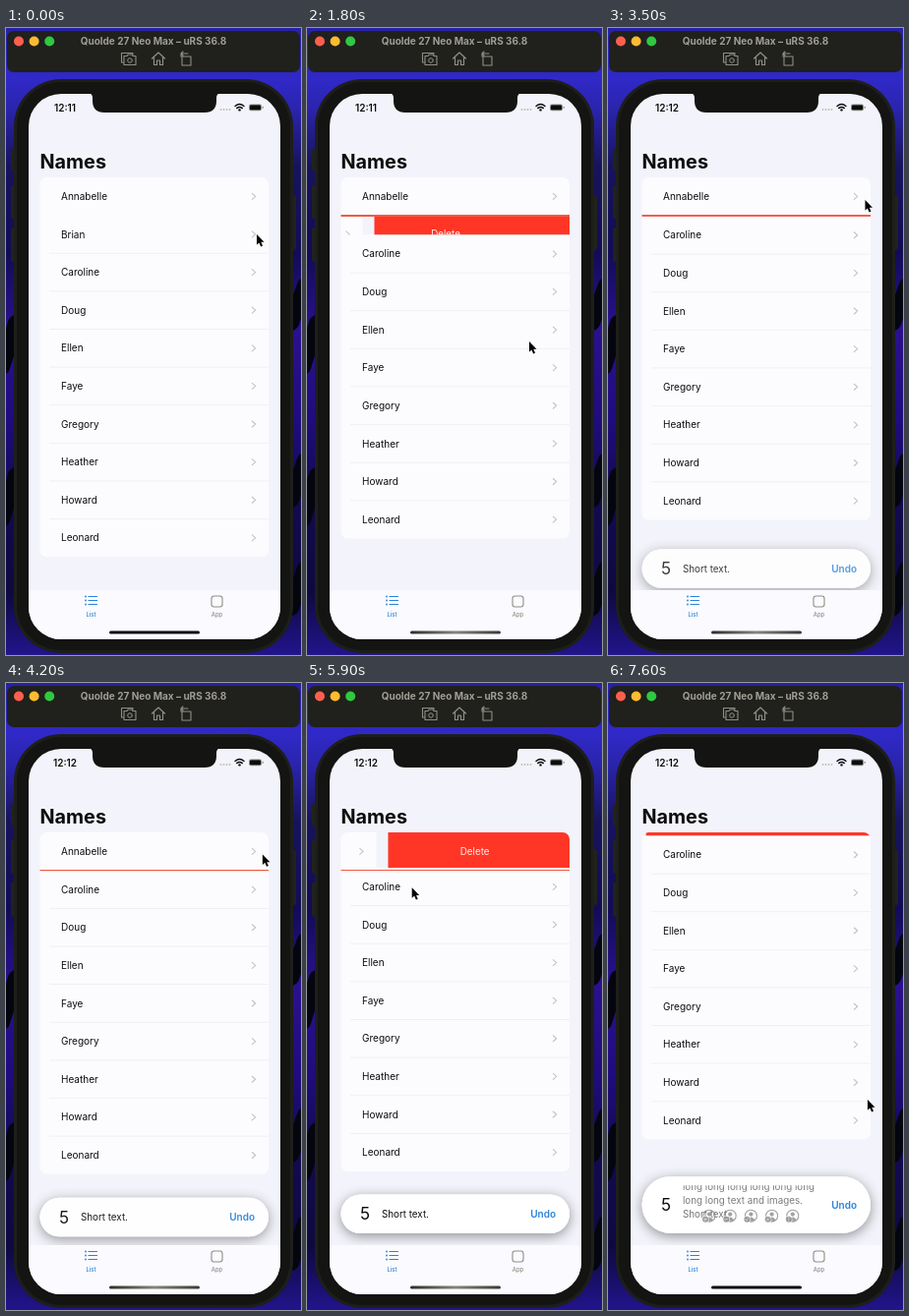
Recreate the animation shown at these times as an HTML page with a canvas. Size 300 by 638 pixels, loop 8000 ms.

```html
<!DOCTYPE html>
<html lang="en">
<head>
<meta charset="utf-8">
<title>Swipe to delete</title>
<style>
html, body { margin: 0; width: 100%; height: 100%; overflow: hidden; background: #0b0b1c; }
canvas { display: block; width: 300px; height: 638px; }
</style>
</head>
<body>
<canvas id="stage"></canvas>
<script>
const LOOP = 8000, W = 300, H = 638, ROW = 38.62;
const LIST = { x: 34.5, y: 152, right: 267 };
const NAMES = ['Annabelle', 'Brian', 'Caroline', 'Doug', 'Ellen', 'Faye', 'Gregory', 'Heather', 'Howard', 'Leonard'];
const HOLDS = [[100, 300], [4800, 5100], [6400, 6600], [6800, 7100], [7100, 7600], [7600, 8000]];
const POINTER = [[300, 255, 210], [1100, 90, 213], [1800, 226, 319], [2800, 254.5, 206.5],
  [3500, 261.5, 175], [5100, 260, 173.5], [5700, 84, 177], [6600, 264, 424]];
const SCREEN = '#f3f3fb', CARD = '#fcfcff', RED = '#ff3626', BLUE = '#2a83d6';
const INK = '#0c0c0c', BODY = '#141412', GRAY = '#8f8f86';

const canvas = document.getElementById('stage');
const c = canvas.getContext('2d');
const ratio = window.devicePixelRatio || 1;
canvas.width = W * ratio;
canvas.height = H * ratio;

const clamp = v => Math.max(0, Math.min(1, v));
const smooth = v => { v = clamp(v); return v * v * (3 - 2 * v); };
const mix = (a, b, k) => a + (b - a) * k;

// What is left of a critically damped spring: 1 at start, falling to 0.
function spring(t, start, speed) {
  const x = Math.max(0, t - start) / 1000 * speed;
  return (1 + x) * Math.exp(-x);
}

function box(x, y, w, h, r, fill) {
  c.beginPath();
  c.roundRect(x, y, w, h, r);
  if (fill) { c.fillStyle = fill; c.fill(); }
}

function disc(x, y, r, fill) {
  c.beginPath();
  c.arc(x, y, r, 0, 7);
  c.fillStyle = fill;
  c.fill();
}

function path(d, color, width = 1, x = 0, y = 0) {
  c.save();
  c.translate(x, y);
  c.strokeStyle = color;
  c.lineWidth = width;
  c.lineCap = c.lineJoin = 'round';
  c.stroke(new Path2D(d));
  c.restore();
}

function text(s, x, y, size, color, weight = 400, align = 'left') {
  c.font = `${weight} ${size}px Inter, "Open Sans", sans-serif`;
  c.textAlign = align;
  c.textBaseline = 'alphabetic';
  c.fillStyle = color;
  c.fillText(s, x, y + size * 0.36);
}

function gradient(x0, y0, x1, y1, stops) {
  const g = c.createLinearGradient(x0, y0, x1, y1);
  stops.forEach(([at, color]) => g.addColorStop(at, color));
  return g;
}

function drawDesktop() {
  c.fillStyle = gradient(0, 0, 0, H, [[0, '#2620a8'], [0.08, '#3029c8'], [0.13, '#2a24ac'], [0.22, '#17145c'],
    [0.36, '#120c58'], [0.48, '#2a118e'], [0.62, '#200c80'], [0.75, '#120a50'], [0.9, '#0e0a40'], [1, '#22148c']]);
  c.fillRect(0, 0, W, H);
  path('M-4 345 L10 300 M-4 500 L10 455 M290 300 L304 262 M290 480 L304 440 M290 590 L304 550', '#05050f', 16);

  box(1, 3, 298, 42, 7, '#20201c');
  ['#ff5f4e', '#fdbc30', '#2fc840'].forEach((color, i) => disc(13 + i * 15.6, 13.5, 5, color));
  text('Quolde 27 Neo Max – uRS 36.8', 150, 13.2, 10, '#a09e96', 700, 'center');
  path('M119 35 H117.5 V25.5 H129 V27 M120 28.5 H123 L124 27 H128 L129 28.5 H132 V37.5 H120 Z', GRAY, 1.1);
  path('M128.3 33 a2.3 2.3 0 1 1 -4.6 0 a2.3 2.3 0 1 1 4.6 0', GRAY);
  path('M148.5 31 L155 25 L161.5 31 M150.5 30 V37.5 H153.5 V33 H156.5 V37.5 H159.5 V30', GRAY, 1.2);
  path('M179 29 H188 V38 H179 Z M178 29 V26 H185 M180 24 L178 26 L180 28', GRAY, 1.1);
}

function drawPhone(t) {
  const button = '#22221c';
  [[5, 123, 22], [5, 160, 34], [5, 203, 35], [290, 170, 56]].forEach(([x, y, h]) => box(x, y, 5, h, 2, button));
  box(8, 52, 284, 584, 48, '#1e1e1a');
  box(11, 55, 278, 578, 45, BODY);
  box(23, 67, 256, 555, 33, SCREEN);
  c.fillStyle = BODY;
  c.fill(new Path2D('M84 66 Q88 67 88 71 V74 Q88 86 100 86 H202 Q214 86 214 74 V71 Q214 67 218 66 Z'));

  text(t < 2300 ? '12:11' : '12:12', 60, 81, 10, INK, 600, 'center');
  for (let i = 0; i < 4; i++) disc(218.5 + i * 3, 83, 0.9, '#bdbdb4');
  path('M233 79.5 Q237.5 75.5 242 79.5 M234.7 81.6 Q237.5 79.2 240.3 81.6', INK, 1.4);
  disc(237.5, 83.4, 1.2, INK);
  box(247, 77.5, 13, 6.8, 2, '#8c8c86');
  box(248, 78.5, 11, 4.8, 1, INK);
  box(260.6, 79.7, 1, 2.4, 0.5, '#8c8c86');
  text('Names', 34.5, 135.5, 19.8, INK, 700);
}

// Red edge follows the drag, then springs to the list edge while the row closes.
function swipe(t, start, release, speed, edge) {
  const drag = smooth((t - start) / (release - start));
  const size = spring(t, release, speed);
  const left = t < release ? mix(LIST.right, edge, drag) : mix(34, edge, size);
  return { size, left, drag };
}

function rowContent(name, y, dx) {
  text(name, 56 + dx, y, 10, INK);
  path('M-1.7 -3 L1.7 0 L-1.7 3', '#c4c4bc', 1.1, 252 + dx, y);
}

function drawRow(name, y, state) {
  const height = state ? ROW * state.size : ROW;
  if (height < 0.3) return height;
  const mid = y + ROW / 2;
  c.save();
  c.beginPath();
  c.rect(LIST.x, y, LIST.right - LIST.x, height);
  c.clip();
  if (state && state.drag > 0) {
    const edge = state.left - Math.min(12, LIST.right - state.left);
    c.fillStyle = SCREEN;
    c.fillRect(LIST.x, y, 240, height);
    c.fillStyle = CARD;
    c.fillRect(LIST.x, y, edge - LIST.x, height);
    rowContent(name, mid, edge - LIST.right);
    c.fillStyle = RED;
    c.beginPath();
    c.rect(state.left, y, LIST.right - state.left, height);
    c.fill();
    c.clip();
    const center = (state.left + LIST.right) / 2;
    text('Delete', mix(center, 99, 0.8 * (1 - state.size)), mid, 9.8, '#fff1ee', 400, 'center');
  } else {
    rowContent(name, mid, 0);
  }
  c.restore();
  return height;
}

function drawList(t) {
  const states = [swipe(t, 5100, 5700, 2.12, 86), swipe(t, 300, 1120, 2.4, 101)];
  const total = ROW * (8 + states[0].size + states[1].size);
  c.save();
  box(LIST.x, LIST.y, LIST.right - LIST.x, total, 7, CARD);
  c.clip();
  let y = LIST.y;
  NAMES.forEach((name, i) => {
    y += drawRow(name, y, states[i]);
    if (i > 0 && i < NAMES.length - 1 && (i > 1 || t < 300)) {
      c.fillStyle = '#f0f0f2';
      c.fillRect(44, y - 0.5, LIST.right - 44, 1);
    }
  });
  c.restore();
  // Hairline left behind by the first removal, thinning as the row closes.
  c.globalAlpha = clamp((t - 1120) / 400) * (1 - clamp((t - 5900) / 1000));
  c.fillStyle = '#ee5a44';
  c.fillRect(LIST.x, 190, LIST.right - LIST.x, 1 + Math.min(1, ROW * states[1].size));
  c.globalAlpha = 1;
}

function person(x, y, badge) {
  const gray = '#6e6e6c';
  c.beginPath();
  c.arc(x, y, 6, 0, 7);
  c.strokeStyle = gray;
  c.lineWidth = 1.1;
  c.stroke();
  disc(x, y - 1.6, 2.1, gray);
  c.fillStyle = gray;
  c.fill(new Path2D(`M${x - 4} ${y + 4} Q${x} ${y - 1.5} ${x + 4} ${y + 4} Q${x} ${y + 7} ${x - 4} ${y + 4}`));
  disc(x - 4, y + 3.6, 3.8, '#fff');
  disc(x - 4, y + 3.6, 3, gray);
  path(badge, '#fff', 0.8, x - 4, y + 3.6);
}

function drawToast(t) {
  const hidden = spring(t, 1900, 1.9);
  if (hidden >= 1) return;
  const grown = 1 - spring(t, 6260, 1.9);
  const bottom = 559.7 + 52 * hidden;
  const height = 39.5 + 25 * grown;
  const top = bottom - height, mid = bottom - height / 2;
  const show = 1 - hidden;
  const pill = color => box(LIST.x, top, LIST.right - LIST.x, height, height / 2, color);

  c.save();
  c.beginPath();
  c.rect(23, 400, 256, 172);
  c.clip();
  c.globalAlpha = show;
  c.shadowColor = 'rgba(40,40,40,.5)';
  c.shadowBlur = 13 * ratio;
  c.shadowOffsetY = 3 * ratio;
  pill('#fff');
  c.shadowColor = 'transparent';
  // Keep the shadow from showing through the faded pill.
  c.globalAlpha = 1;
  pill(SCREEN);
  c.globalAlpha = show;
  pill('#fff');

  text('5', 59, mid, 17, INK, 400, 'center');
  text('Undo', 253, mid, 10, BLUE, 600, 'right');
  c.beginPath();
  c.rect(70, top + 9, 150, height - 9);
  c.clip();
  c.globalAlpha = show * (1 - 0.6 * grown);
  text('Short text.', 76, bottom - 19.5, 9.8, INK);
  if (grown > 0) {
    c.globalAlpha = grown * 0.9;
    ['long long text and images.', 'long long long long long long', 'long long long long long long']
      .forEach((line, i) => text(line, 76, bottom - 33.3 - 13.5 * i, 9.8, '#343432'));
    ['M-1.5 0 H1.5 M0 -1.5 V1.5', 'M-1.5 0 H1.5', 'M-1.4 0 L-.3 1.2 L1.4 -1.2',
      'M-1.2 -1.2 L1.2 1.2 M1.2 -1.2 L-1.2 1.2', 'M0 -1.6 V.3 M0 1.5 V1.6']
      .forEach((badge, i) => person(103 + i * 21.2, bottom - 17.5, badge));
  }
  c.restore();
}

function drawTabs(t) {
  box(23, 572, 256, 50, [0, 0, 33, 33], '#fafaff');
  for (let i = 0; i < 3; i++) {
    disc(81, 578.5 + i * 4, 0.9, BLUE);
    path('M84 0 H92.5', BLUE, 1.2, 0, 578.5 + i * 4);
  }
  text('List', 86.5, 597, 5.8, BLUE, 500, 'center');
  box(209, 578, 11, 11, 2.5);
  c.strokeStyle = GRAY;
  c.lineWidth = 1.1;
  c.stroke();
  text('App', 214.5, 597, 5.8, GRAY, 500, 'center');
  const faded = t >= 1200 && t < 6000;
  box(105, 613.6, 92, 3, 1.5, faded ? gradient(105, 0, 197, 0, [[0, '#2c2c28'], [0.5, '#858580'], [1, '#3a3a36']]) : INK);
}

function drawPointer(t) {
  let i = POINTER.findIndex(p => p[0] > t);
  if (i < 0) i = POINTER.length;
  const a = POINTER[Math.max(0, i - 1)], b = POINTER[Math.min(i, POINTER.length - 1)];
  const k = a === b ? 0 : smooth((t - a[0]) / (b[0] - a[0]));
  c.save();
  c.translate(mix(a[1], b[1], k), mix(a[2], b[2], k));
  const arrow = new Path2D('M0 0 V10.5 L2.4 8.4 L4.2 12.4 L6 11.6 L4.3 7.8 H7.5 Z');
  c.strokeStyle = '#f6f6f2';
  c.lineWidth = 1.6;
  c.stroke(arrow);
  c.fillStyle = '#000';
  c.fill(arrow);
  c.restore();
}

function step(ms) {
  const t = Math.floor(ms % LOOP / 100) * 100;
  const hold = HOLDS.find(([from, to]) => t >= from && t < to);
  return hold ? hold[0] : t;
}

const begin = performance.now();
function frame() {
  const t = step(performance.now() - begin);
  c.setTransform(ratio, 0, 0, ratio, 0, 0);
  drawDesktop();
  drawPhone(t);
  drawList(t);
  drawToast(t);
  drawTabs(t);
  drawPointer(t);
  requestAnimationFrame(frame);
}
frame();
</script>
</body>
</html>
```
